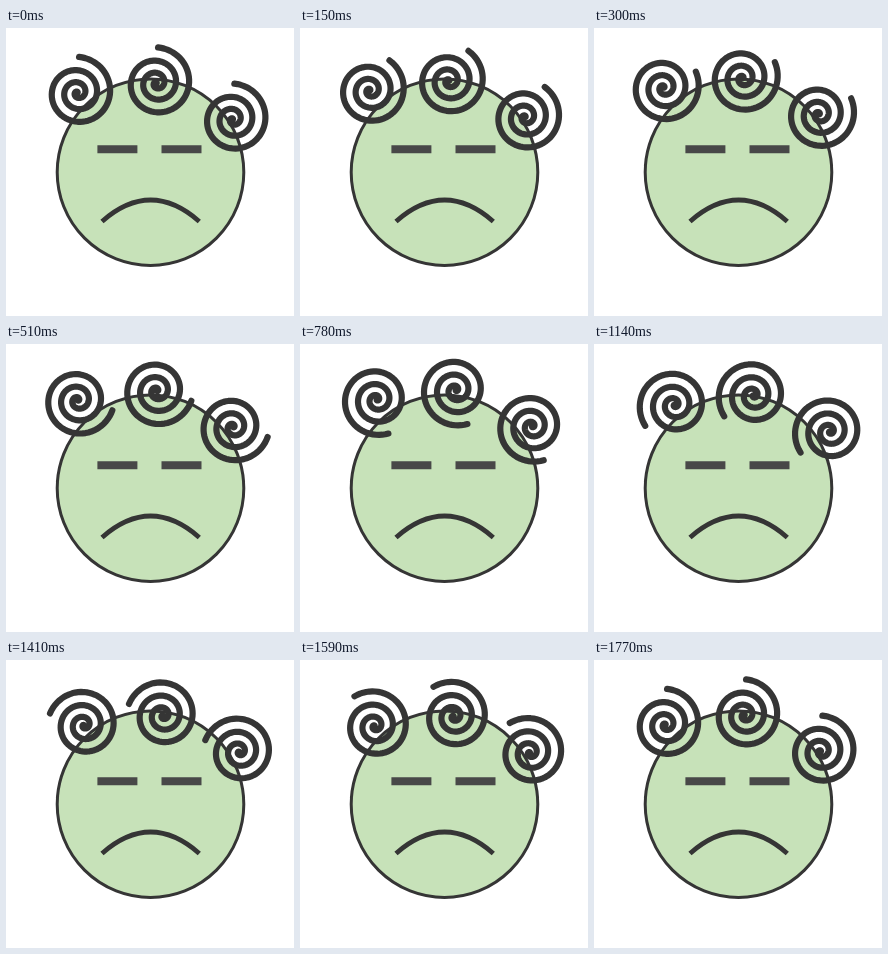
Recreate the animation shown at these times as an HTML page. Size 288 by 288 pixels, loop 1.8 s.

```html
<!DOCTYPE html>
<html lang="en">
<head>
<meta charset="utf-8">
<title>Dizzy face</title>
<style>
  html, body { margin: 0; width: 100%; height: 100%; overflow: hidden; background: #fff; }
  svg { display: block; width: 100vw; height: 100vh; }
</style>
</head>
<body>
<svg viewBox="0 0 288 288">
  <defs>
    <path id="spiral" fill="none" stroke="#353535" stroke-width="6.2" stroke-linecap="round" stroke-linejoin="round"/>
  </defs>
  <circle cx="144.5" cy="144.2" r="93.3" fill="#c7e2b9" stroke="#353535" stroke-width="3"/>
  <path d="M91.4 121.3H131.4M155.5 121.3H195.5" stroke="#484848" stroke-width="8"/>
  <path d="M96 193.5Q144.6 150.7 193.3 193.5" fill="none" stroke="#353535" stroke-width="4.8"/>
  <g id="curls"></g>
</svg>
<script>
const FRAME_MS = 30, FRAMES = 60;
const PIVOTS = [[75, 60.7], [154, 51.2], [230.3, 87.4]];
const CENTER = { x: -3.4, y: 4 };
const TURNS = 3.1, OUTER = 35.8, GROWTH = 1.2, END_ANGLE = -Math.PI / 2 + 0.04;

// The radius grows slightly faster than linearly, so the tail flares out.
function spiralPath(steps = 220) {
  const points = [];
  for (let i = 0; i <= steps; i++) {
    const t = i / steps;
    const angle = END_ANGLE + (1 - t) * TURNS * 2 * Math.PI;
    const radius = OUTER * t ** GROWTH;
    points.push((CENTER.x + radius * Math.cos(angle)).toFixed(2) + " " +
                (CENTER.y + radius * Math.sin(angle)).toFixed(2));
  }
  return "M" + points.join("L");
}

document.getElementById("spiral").setAttribute("d", spiralPath());

const curls = PIVOTS.map(() => {
  const use = document.createElementNS("http://www.w3.org/2000/svg", "use");
  use.setAttribute("href", "#spiral");
  return document.getElementById("curls").appendChild(use);
});

function draw(ms) {
  const frame = Math.floor(ms / FRAME_MS) % FRAMES;
  const degrees = 360 * frame / (FRAMES - 1);
  curls.forEach((curl, i) =>
    curl.setAttribute("transform", `translate(${PIVOTS[i]}) rotate(${degrees})`));
}

const start = performance.now();
function tick() {
  draw(performance.now() - start);
  requestAnimationFrame(tick);
}
draw(0);
requestAnimationFrame(tick);
</script>
</body>
</html>
```
